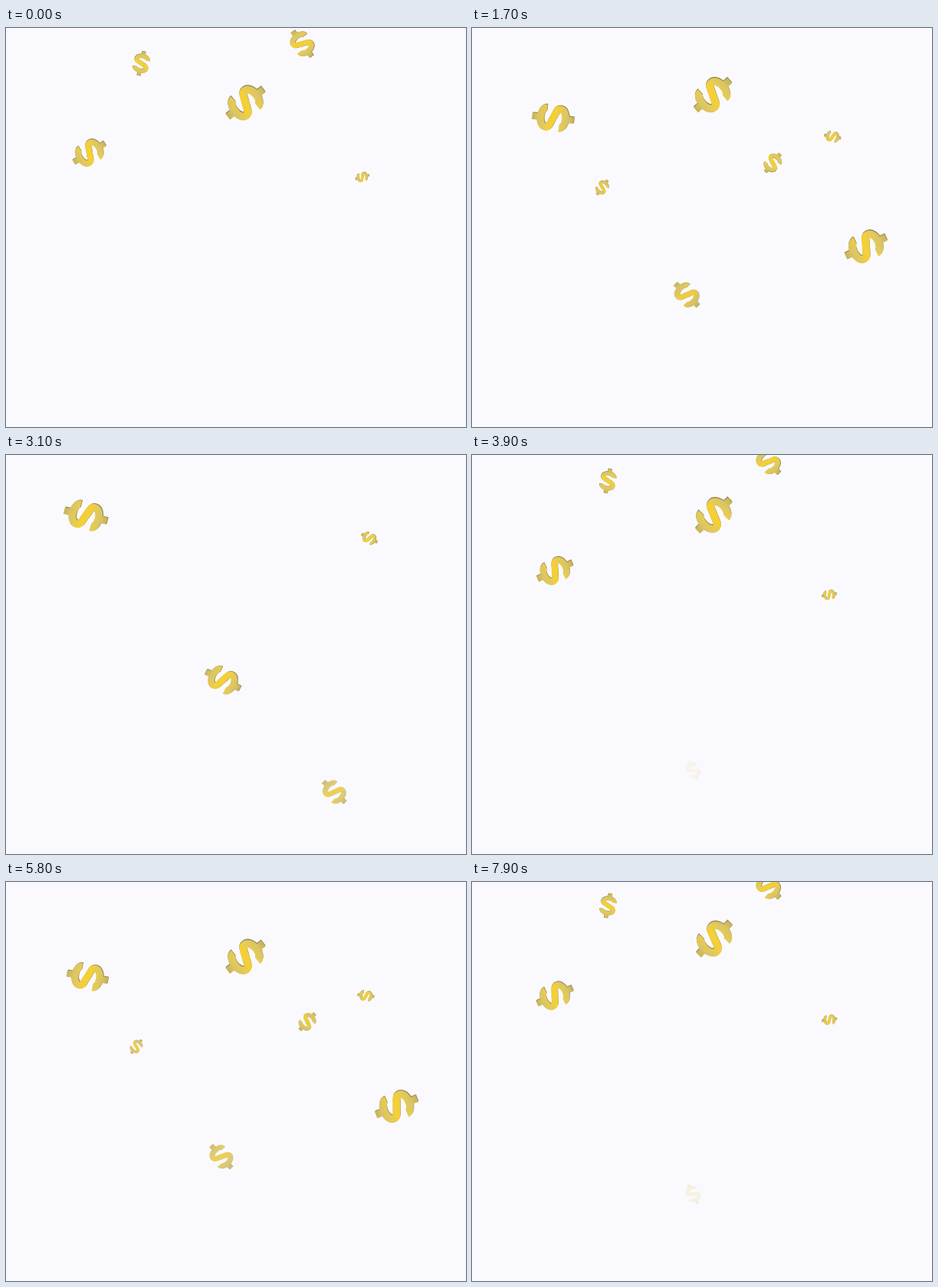
Recreate the animation shown at these times as an HTML page with a canvas. Size 600 by 521 pixels, loop 8000 ms.

```html
<!DOCTYPE html>
<html lang="en">
<head>
<meta charset="utf-8">
<title>Falling dollars</title>
<style>
  html, body { margin: 0; width: 100%; height: 100%; overflow: hidden; background: #faf9fe; }
  canvas { display: block; }
</style>
</head>
<body>
<canvas id="stage" width="600" height="521"></canvas>
<script>
const ctx = document.getElementById('stage').getContext('2d');
const LOOP = 8000, STEP = 100, CYCLE = 4.03, LIFE = 3, FADE = 0.55;

// xs: horizontal position every half second of life; y = y0 + speed * age
// runs: [start in seconds, first angle, degrees per second]
const tracks = [
  { size: 60, xs: [104, 104, 104, 104.5, 107.5, 111.5, 125], y0: -40, speed: 90,
    runs: [[-0.05, 9, 50], [1.775, 169, -49]] },
  { size: 33, xs: [181.5, 178.5, 175.5, 173, 171, 170, 171], y0: -28, speed: 95.3,
    runs: [[-0.78, 2, 14]] },
  { size: 60, xs: [331, 319.5, 308, 296, 285, 280, 290], y0: -21, speed: 147.5,
    runs: [[-0.805, 13.5, 48.3], [0.965, 13.5, 48.3]] },
  { size: 42, xs: [387, 386.5, 386, 386, 388.5, 393, 400], y0: -46, speed: 91.3,
    runs: [[-0.73, 110, 45]] },
  { size: 24, xs: [486.5, 482, 477.5, 472.5, 467.5, 464, 468.5], y0: -18, speed: 92.5,
    runs: [[-0.03, 182, -47], [1.73, 182, -47]] },
  { size: 60, xs: [586, 555.5, 525, 494, 463, 432.5, 410], y0: 155, speed: 110.5,
    runs: [[0.52, 6, 49.6]] }
];

// Dollar sign of height 1, centred on the origin
const curve = new Path2D('M.225-.16C.225-.24 .13-.295 0-.295C-.13-.295-.225-.235-.225-.15' +
  'C-.225-.055-.11-.055 0 0C.11.055 .225.055 .225.15C.225.235 .13.295 0 .295C-.13.295-.225.24-.225.16');
const bars = new Path2D('M-.078-.49h.156v.13h-.156zM-.078.36h.156v.13h-.156z');

const gold = ctx.createLinearGradient(0, -0.5, 0, 0.5);
[[0, '#c6b158'], [0.16, '#d9c564'], [0.34, '#e9cc50'], [0.42, '#f3cf38'], [0.58, '#f3cf38'],
 [0.66, '#e9cc50'], [0.84, '#d9c564'], [1, '#c6b158']]
  .forEach(([at, color]) => gold.addColorStop(at, color));

function smooth(list, pos) {
  const i = Math.min(Math.floor(pos), list.length - 2), f = pos - i;
  const at = k => list[Math.max(0, Math.min(list.length - 1, k))];
  const [a, b, c, d] = [at(i - 1), at(i), at(i + 1), at(i + 2)];
  return b + f / 2 * (c - a + f * (2 * a - 5 * b + 4 * c - d + f * (3 * (b - c) + d - a)));
}

function paint(style, alpha) {
  ctx.globalAlpha = alpha;
  ctx.fillStyle = ctx.strokeStyle = style;
  ctx.stroke(curve);
  ctx.fill(bars);
}

function drawDollar(x, y, size, angle, alpha) {
  ctx.save();
  ctx.translate(x, y);
  ctx.rotate(angle * Math.PI / 180);
  ctx.scale(size, size);
  ctx.lineWidth = 0.168;
  ctx.translate(-0.012, -0.008);
  paint('#8d7f48', alpha ** 4); // the dark edge vanishes before the face
  ctx.translate(0.016, 0.012);
  paint(gold, alpha);
  ctx.restore();
}

function draw(time) {
  ctx.fillStyle = '#faf9fe';
  ctx.fillRect(0, 0, 600, 521);
  ctx.save();
  ctx.beginPath();
  ctx.rect(48, 0, 504, 521);
  ctx.clip();
  for (const { size, xs, y0, speed, runs } of tracks) {
    for (const [start, angle, spin] of runs) {
      const age = (time - start + CYCLE) % CYCLE;
      if (age >= LIFE) continue;
      const scale = 1 - 0.0075 * age ** 4;
      const alpha = Math.min(1, (LIFE - age) / FADE);
      drawDollar(smooth(xs, age * 2), y0 + speed * age, size * scale, angle + spin * age, alpha);
    }
  }
  ctx.restore();
}

function tick() {
  const now = performance.now() % LOOP;
  draw(Math.floor(now / STEP) * STEP / 1000);
  requestAnimationFrame(tick);
}
tick();
</script>
</body>
</html>
```
